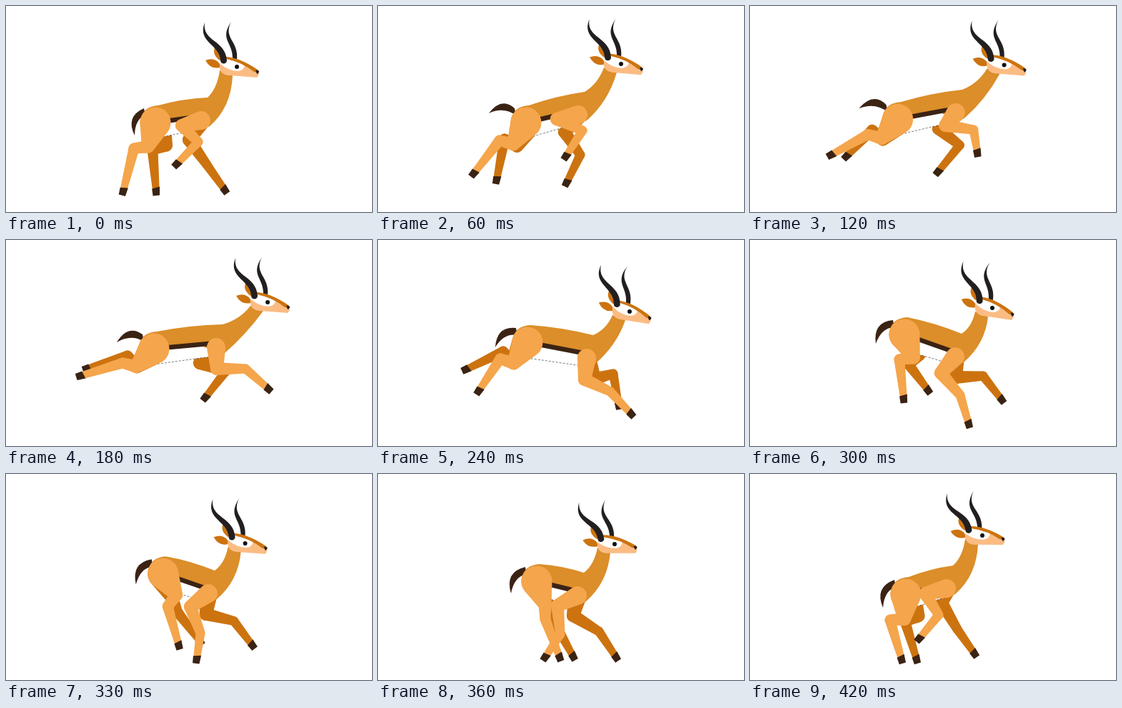
An HTML page with a canvas for the animation above (450 ms loop, 512 px wide and 288 px high).

```html
<!DOCTYPE html>
<html lang="en">
<head>
<meta charset="utf-8">
<title>Galloping antelope</title>
<style>
  html, body { margin: 0; width: 100%; height: 100%; overflow: hidden; background: #fff; }
  canvas { display: block; }
</style>
</head>
<body>
<canvas id="stage" width="512" height="288"></canvas>
<script>
const ctx = document.getElementById('stage').getContext('2d');
const LOOP = 450, STEP = 30;
const COAT = '#db8e29', NEAR = '#f5a54b', FAR = '#cc7310', FACE = '#fbbc84';
const DARK = '#3b2314', HORN = '#231f20';

// Key poses of the stride: times in ms, joints as x, y pairs.
const TIMES = [0, 60, 180, 240, 300, 360, 420];
const hipTrack = [209,163, 207,163, 207,152, 209,143, 216,132, 222,150, 218,168];
const shoulderTrack = [273,160, 280,152, 294,150, 292,165, 287,163, 279,170, 275,160];
const eyeTrack = [323,85, 340,81, 366,87, 352,100, 339,95, 331,98, 325,86];
const tiltTrack = [0, 0, 0.5, 0, 0, 0, 4.5, 0, 4, 0, -4.5, 0, -4, 0];
const tailTrack = [-13,34, -36,3, -36,7, -29,23, -24,29, -20,33, -16,35];

const nearHind = {
  color: NEAR,
  hock: [179,199, 170,188, 163,172, 171,166, 209,167, 234,203, 196,204],
  hoof: [164,259, 134,234, 104,190, 141,211, 215,222, 254,256, 212,259]
};
const farHind = {
  color: FAR,
  hock: [205,201, 177,186, 170,162, 175,156, 222,174, 247,208, 217,206],
  hoof: [210,259, 166,243, 113,180, 123,181, 249,210, 273,255, 233,259]
};
const nearFore = {
  color: NEAR,
  elbow: [246,167, 250,158, 295,180, 289,195, 267,186, 251,184, 245,167],
  knee: [269,190, 286,174, 335,180, 325,212, 294,217, 255,224, 264,197],
  hoof: [239,221, 263,210, 367,208, 354,243, 306,257, 234,256, 237,230]
};
const farFore = {
  color: FAR,
  elbow: [256,187, 261,176, 271,172, 303,194, 288,192, 273,198, 268,180],
  knee: [281,222, 283,208, 307,184, 329,187, 326,190, 309,220, 290,217],
  hoof: [306,257, 264,247, 279,220, 337,231, 352,223, 333,256, 314,251]
};

const wrap = (i, n) => ((i % n) + n) % n;

// Periodic cubic Hermite interpolation through the key poses.
function sample(track, time) {
  const n = TIMES.length;
  const keyTime = k => TIMES[wrap(k, n)] + LOOP * Math.floor(k / n);
  let i = n - 1;
  while (TIMES[i] > time) i--;
  const t0 = keyTime(i), span = keyTime(i + 1) - t0, u = (time - t0) / span;
  return [0, 1].map(axis => {
    const value = k => track[2 * wrap(k, n) + axis];
    const slope = k => (value(k + 1) - value(k - 1)) / (keyTime(k + 1) - keyTime(k - 1)) * span;
    const a = value(i), b = value(i + 1), v = 1 - u;
    return a * (1 + 2 * u) * v * v + slope(i) * u * v * v
         + b * u * u * (3 - 2 * u) - slope(i + 1) * u * u * v;
  });
}

const add = (p, dx, dy) => [p[0] + dx, p[1] + dy];
const mid = (p, q) => [(p[0] + q[0]) / 2, (p[1] + q[1]) / 2];

function fill(path, color) {
  ctx.fillStyle = color;
  ctx.fill(new Path2D(path));
}

// Chain of rounded, tapering segments.
function limb(points, radii, color) {
  ctx.fillStyle = color;
  for (let i = 0; i + 1 < points.length; i++) {
    const [a, b] = [points[i], points[i + 1]];
    const dx = b[0] - a[0], dy = b[1] - a[1];
    const ratio = (radii[i] - radii[i + 1]) / Math.hypot(dx, dy);
    const angle = Math.atan2(dy, dx), spread = Math.acos(Math.max(-1, Math.min(1, ratio)));
    ctx.beginPath();
    ctx.arc(...a, radii[i], angle + spread, angle - spread + 2 * Math.PI);
    ctx.arc(...b, radii[i + 1], angle - spread, angle + spread);
    ctx.fill();
  }
}

function hoof(from, to) {
  ctx.save();
  ctx.translate(...to);
  ctx.rotate(Math.atan2(to[1] - from[1], to[0] - from[0]));
  ctx.clearRect(1, -7, 6, 14);
  fill('M-6 -5.5L-4 5.5L5 5.5L6 -4.5Z', DARK);
  ctx.restore();
}

// Knee placed in front of the line from hip to hock.
function bendKnee(hip, hock, thigh = 35, shank = 20) {
  const dx = hock[0] - hip[0], dy = hock[1] - hip[1];
  const d = Math.hypot(dx, dy);
  const along = (thigh ** 2 - shank ** 2 + d * d) / (2 * d);
  const out = Math.sqrt(Math.max(0, thigh ** 2 - along ** 2));
  return add(hip, (dx * along + dy * out) / d, (dy * along - dx * out) / d);
}

function drawLeg(points, radii, color) {
  const [joint, end] = points.slice(-2);
  const d = Math.hypot(end[0] - joint[0], end[1] - joint[1]), k = 1 - 5 / d;
  const ankle = add(joint, (end[0] - joint[0]) * k, (end[1] - joint[1]) * k);
  limb([...points.slice(0, -1), ankle], radii, color);
  ctx.save();
  ctx.translate(...end);
  ctx.rotate(Math.atan2(end[1] - joint[1], end[0] - joint[0]));
  fill('M-6 -5.5L-4 5.5L6 5L6 -4.5Z', DARK);
  ctx.restore();
}

function drawHind(leg, hip, time) {
  const hock = sample(leg.hock, time);
  drawLeg([hip, bendKnee(hip, hock), hock, sample(leg.hoof, time)], [21.5, 9, 7.5, 5], leg.color);
}

function drawFore(leg, shoulder, time) {
  const joints = [leg.elbow, leg.knee, leg.hoof].map(track => sample(track, time));
  drawLeg([shoulder, ...joints], [13, 9, 6.5, 5], leg.color);
}

function drawTail(hip, [x, y]) {
  const root = add(hip, -16, -16);
  const bow = (along, out) => add(root, x * along - y * out, y * along + x * out);
  fill(`M${add(root, 0, -4)}Q${bow(0.45, 0.6)} ${add(root, x, y)}Q${bow(0.4, 0.22)} ${add(root, 2, 6)}Z`, DARK);
}

function drawBelly(hip, shoulder) {
  const back = add(hip, 0, 22), front = add(shoulder, 0, 12);
  fill(`M${hip}L${shoulder}L${front}L${back}Z`, '#fff');
  ctx.strokeStyle = '#222';
  ctx.lineWidth = 0.6;
  ctx.setLineDash([3, 2]);
  ctx.stroke(new Path2D(`M${back}L${front}`));
  ctx.setLineDash([]);
}

function drawBody(hip, shoulder, eye) {
  const croup = add(hip, 4, -24), withers = add(shoulder, 9, -32);
  const nape = add(eye, -24, 5), throat = add(eye, -6, 12);
  fill(`M${add(hip, -21, -4)}Q${add(hip, -17, -23)} ${croup}
    Q${add(mid(croup, withers), 0, -4)} ${withers}
    Q${add(mid(withers, nape), 5, 6)} ${nape}L${throat}
    Q${add(shoulder, 42, -18)} ${add(shoulder, 12, 8)}
    L${add(shoulder, 0, 13)}L${add(shoulder, 0, -5)}L${hip}Z`, COAT);
  ctx.strokeStyle = DARK;
  ctx.lineWidth = 6.5;
  ctx.stroke(new Path2D(`M${hip}L${add(shoulder, 0, -6)}`));
}

function drawHead(eye, tilt) {
  ctx.save();
  ctx.translate(...eye);
  ctx.rotate(tilt * Math.PI / 180);
  fill('M-8 -63C-25 -38 -5 -34 -6 -11L0 -10C3 -36 -20 -40 -8 -63Z', HORN);
  fill('M-24 -9Q-36 -18 -30 -29Q-21 -23 -20 -11Z', FAR);
  fill('M-24 -4Q-31 -14 -44 -9Q-37 4 -24 1Z', FAR);
  fill('M-20 -10C-29 2 -22 12 -10 12L28 15Q32 11 30 6L8 -6Z', FACE);
  fill('M-17 -11Q-3 -13 11 -2Q10 5 1 6Q-13 5 -23 -4Z', '#fff');
  fill('M-17 -14Q2 -14 29 4L30 8L24 7Q8 -6 -15 -11Z', FAR);
  fill('M26 5Q29 4 31 6Q31 9 28 10Z', HORN);
  ctx.fillStyle = '#111';
  ctx.beginPath();
  ctx.arc(0, 0, 3, 0, 2 * Math.PI);
  ctx.fill();
  fill('M-45 -62C-56 -34 -24 -32 -23 -9A4.5 4.5 0 0 0 -14 -9C-16 -38 -49 -35 -45 -62Z', HORN);
  ctx.restore();
}

function draw(time) {
  const [hip, shoulder, eye] = [hipTrack, shoulderTrack, eyeTrack].map(track => sample(track, time));
  ctx.fillStyle = '#fff';
  ctx.fillRect(0, 0, 512, 288);
  drawTail(hip, sample(tailTrack, time));
  drawHind(farHind, hip, time);
  drawFore(farFore, shoulder, time);
  drawBelly(hip, shoulder);
  drawBody(hip, shoulder, eye);
  drawHead(eye, sample(tiltTrack, time)[0]);
  drawHind(nearHind, hip, time);
  drawFore(nearFore, shoulder, time);
}

function tick() {
  draw(Math.floor(performance.now() % LOOP / STEP) * STEP);
  requestAnimationFrame(tick);
}
tick();
</script>
</body>
</html>
```
